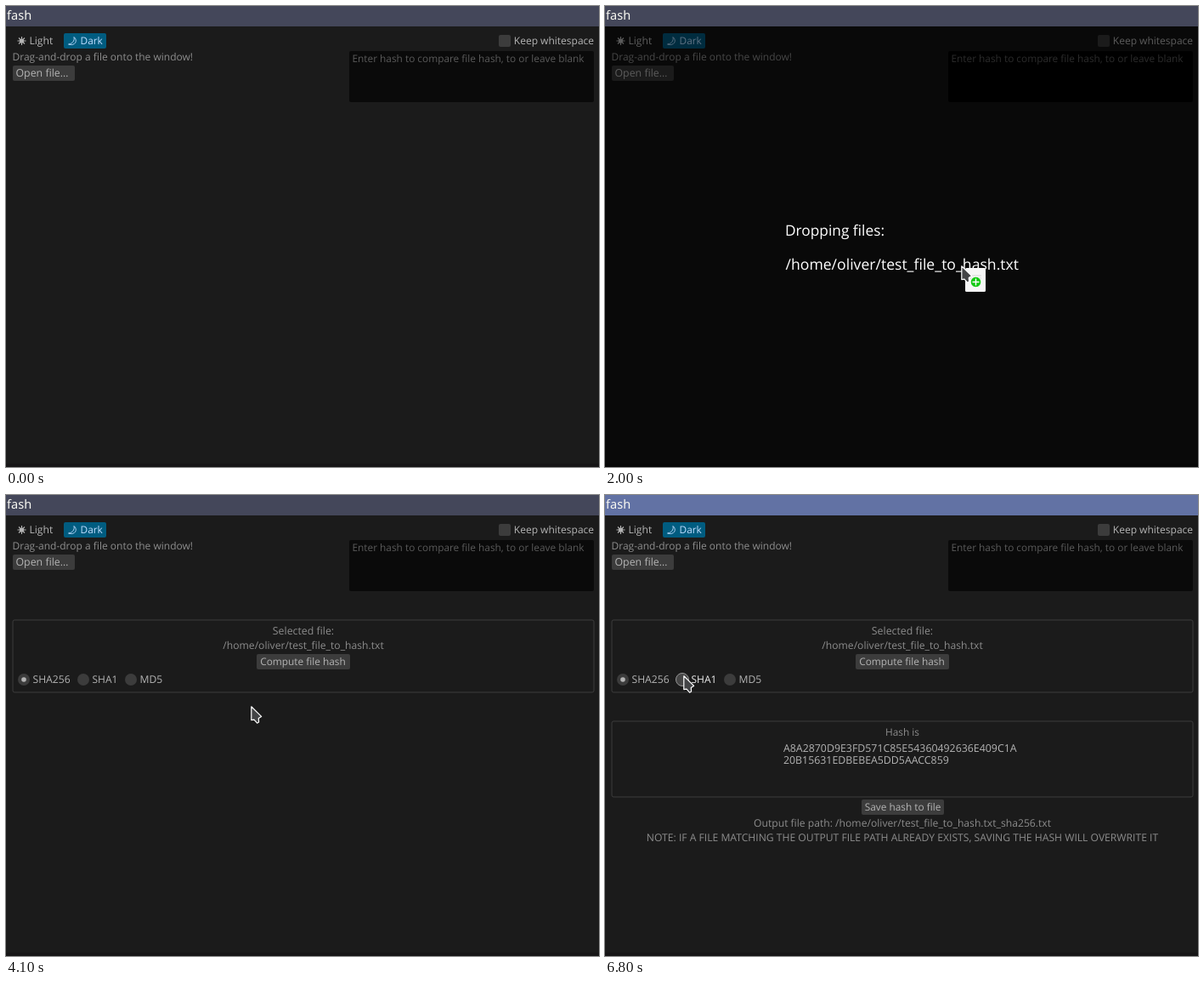
These frames come from a looping animation (698x542 px, 8000 ms). An HTML page:

```html
<!DOCTYPE html>
<html lang="en">
<head>
<meta charset="utf-8">
<title>fash</title>
<style>
  html, body { margin: 0; width: 100%; height: 100%; overflow: hidden; background: #1b1b1b; }
  svg { display: block; width: 698px; height: 542px; }
  text { font: 12px "Open Sans", "Noto Sans", sans-serif; fill: #b4b4b4; text-rendering: geometricPrecision; white-space: pre; }
  .label { fill: #8c8c8c; }
  .hint { fill: #5a5a5a; }
  .mid { text-anchor: middle; }
  .s { font-size: 11.85px; }
  .l { font-size: 12.15px; }
  .xl { font-size: 12.35px; }
  .big { font-size: 17.6px; fill: #fff; }
  .box { fill: #3c3c3c; }
  .frame { fill: none; stroke: #3c3c3c; }
  .hover .box { fill: #464646; stroke: #969696; }
  .hover text { fill: #f0f0f0; }
  .press .box { fill: #373737; stroke: #fff; }
  .press text { fill: #fff; }
  .off { display: none; }
  #title { fill: #44475a; }
  #title.focus { fill: #6272a4; }
</style>
</head>
<body>
<svg viewBox="0 0 698 542">
  <defs>
    <filter id="dim" filterUnits="userSpaceOnUse" x="0" y="24" width="698" height="518" color-interpolation-filters="sRGB">
      <feComponentTransfer>
        <feFuncR type="linear" slope=".53" intercept="-.017"/>
        <feFuncG type="linear" slope=".53" intercept="-.017"/>
        <feFuncB type="linear" slope=".53" intercept="-.017"/>
      </feComponentTransfer>
    </filter>
  </defs>

  <g id="app">
    <rect y="24" width="698" height="518" fill="#1b1b1b"/>
    <rect y="538" width="698" height="4" fill="#171617"/>

    <g stroke="#b4b4b4" stroke-width="1.1">
      <path d="M18.5 36v10M13.5 41h10M15 37.5l7 7M22 37.5l-7 7"/>
      <circle cx="18.5" cy="41" r="2" fill="#b4b4b4"/>
    </g>
    <text class="l" x="27.5" y="45">Light</text>
    <rect x="68" y="32" width="50" height="18" rx="2" fill="#005c80"/>
    <path d="M80 36.5C85 40.5 81.5 47.5 73.5 45C78 44.5 81 41 80 36.5Z" fill="none" stroke="#c0deff" stroke-width=".9"/>
    <text class="s" x="87.5" y="45" style="fill:#c0deff">Dark</text>
    <text class="label" x="7.5" y="64">Drag-and-drop a file onto the window!</text>
    <rect class="box" x="8" y="70" width="73" height="18" rx="2"/>
    <text class="xl" x="11.5" y="83">Open file…</text>

    <rect class="box" x="580" y="34" width="14" height="14" rx="2"/>
    <text x="692" y="45" text-anchor="end">Keep whitespace</text>
    <rect x="404" y="53" width="288" height="60" rx="2" fill="#0a0a0a"/>
    <text class="hint s" x="407.5" y="66">Enter hash to compare file hash, to or leave blank</text>

    <g id="file">
      <rect class="frame" x="8" y="147" width="684" height="85" rx="2"/>
      <text class="label mid xl" x="350" y="164">Selected file:</text>
      <text class="label mid l" x="350" y="181">/home/oliver/test_file_to_hash.txt</text>
      <g id="compute">
        <rect class="box" x="295" y="187" width="110" height="18" rx="2"/>
        <text class="mid s" x="349.5" y="200">Compute file hash</text>
      </g>
      <circle class="box" cx="21" cy="217" r="7"/>
      <circle cx="21" cy="217" r="2.8" fill="#b4b4b4"/>
      <text class="l" x="31.5" y="221">SHA256</text>
      <g id="sha1">
        <circle class="box" cx="91" cy="217" r="7"/>
        <text x="101.5" y="221">SHA1</text>
      </g>
      <circle class="box" cx="147" cy="217" r="7"/>
      <text class="l" x="157.5" y="221">MD5</text>
    </g>

    <g id="result">
      <rect class="frame" x="8" y="266" width="684" height="89" rx="2"/>
      <text class="label mid s" x="350" y="283">Hash is</text>
      <text class="xl" x="210" y="302">A8A2870D9E3FD571C85E54360492636E409C1A</text>
      <text class="xl" x="210" y="316">20B15631EDBEBEA5DD5AACC859</text>
      <rect class="box" x="302" y="358" width="97" height="18" rx="2"/>
      <text class="mid s" x="350.5" y="371">Save hash to file</text>
      <text class="label mid l" x="350" y="390">Output file path: /home/oliver/test_file_to_hash.txt_sha256.txt</text>
      <text class="label mid l" x="350" y="407">NOTE: IF A FILE MATCHING THE OUTPUT FILE PATH ALREADY EXISTS, SAVING THE HASH WILL OVERWRITE IT</text>
    </g>
  </g>

  <g id="drop">
    <text class="big" x="212" y="270" style="font-size:17.3px">Dropping files:</text>
    <text class="big" x="212.5" y="310">/home/oliver/test_file_to_hash.txt</text>
  </g>

  <rect id="title" width="698" height="24"/>
  <text x="1" y="16" style="font:14.6px 'Noto Sans','Open Sans',sans-serif;fill:#f8f8f2">fash</text>

  <g id="cursor">
    <g id="paper">
      <rect x="5" y="3" width="24" height="28" rx="1.5" fill="#f6f6f6"/>
      <path d="M9 12h15M9 15h15" stroke="#d4d4d4"/>
    </g>
    <path d="M.8.8V16.6L4 16.2 7.6 20.2 9.6 19 9.3 14.6 12.6 12.4Z" fill="#434446" stroke="#fff" stroke-width="1.2" stroke-linejoin="round"/>
    <g id="plus">
      <circle cx="17.5" cy="19.5" r="6.3" fill="#12c912" stroke="#fff"/>
      <path d="M13.5 19.5h8M17.5 15.5v8" stroke="#fff" stroke-width="1.4"/>
    </g>
  </g>
</svg>

<script>
const LOOP = 8000, TICK = 100;
const el = id => document.getElementById(id);
const show = (id, on) => el(id).classList.toggle('off', !on);
const lerp = (a, b, p) => a + (b - a) * p;
const mix = (a, b, p) => a.map((v, i) => lerp(v, b[i], p));
const clamp = p => Math.min(1, Math.max(0, p));
const smooth = p => p * p * (3 - 2 * p);
const easeOut = (p, power) => 1 - (1 - p) ** power;

const enter = [678, 380], middle = [348, 278], button = [306, 193], nearRadio = [86, 206], radio = [92, 212];

// Pointer tip at time t
function tip(t) {
  if (t < 4000) {
    const p = clamp((t - 1500) / 800);
    return [lerp(enter[0], middle[0], easeOut(p, 1.56)), lerp(enter[1], middle[1], easeOut(p, 1.37))];
  }
  if (t < 5800) {
    const p = clamp((t - 3900) / 500);
    const [x, y] = mix(middle, button, smooth(p));
    return [x - 55 * Math.sin(Math.PI * p ** 1.3), y];
  }
  const p = clamp((t - 5700) / 900);
  return mix(mix(button, nearRadio, smooth(p)), radio, clamp((t - 6600) / 200));
}

function setHover(id, on, grow) {
  const g = el(id), box = g.querySelector('.box');
  g.classList.toggle('hover', on);
  for (const [name, [rest, step]] of Object.entries(grow))
    box.setAttribute(name, rest + (on ? step : 0));
}

function render(time) {
  const t = Math.floor(time % LOOP / TICK) * TICK;
  const dropping = t >= 1600 && t < 2800, dragging = t >= 1500 && t < 2700;

  show('drop', dropping);
  if (dropping) el('app').setAttribute('filter', 'url(#dim)');
  else el('app').removeAttribute('filter');

  show('file', t >= 2800);
  show('result', t >= 5200);
  el('title').classList.toggle('focus', t >= 5000);

  setHover('compute', t >= 4400 && t < 5900, {
    x: [295, -.5], y: [187, -.5], width: [110, 1], height: [18, 1], rx: [2, 1]
  });
  el('compute').classList.toggle('press', t === 5100);
  setHover('sha1', t >= 6700, { r: [7, .5] });

  show('cursor', t >= 1500);
  show('paper', dragging);
  show('plus', dragging);
  const [x, y] = tip(t).map(Math.round);
  el('cursor').setAttribute('transform', `translate(${x} ${y})`);
}

const start = performance.now();
function loop() {
  render(performance.now() - start);
  requestAnimationFrame(loop);
}
loop();
</script>
</body>
</html>
```
